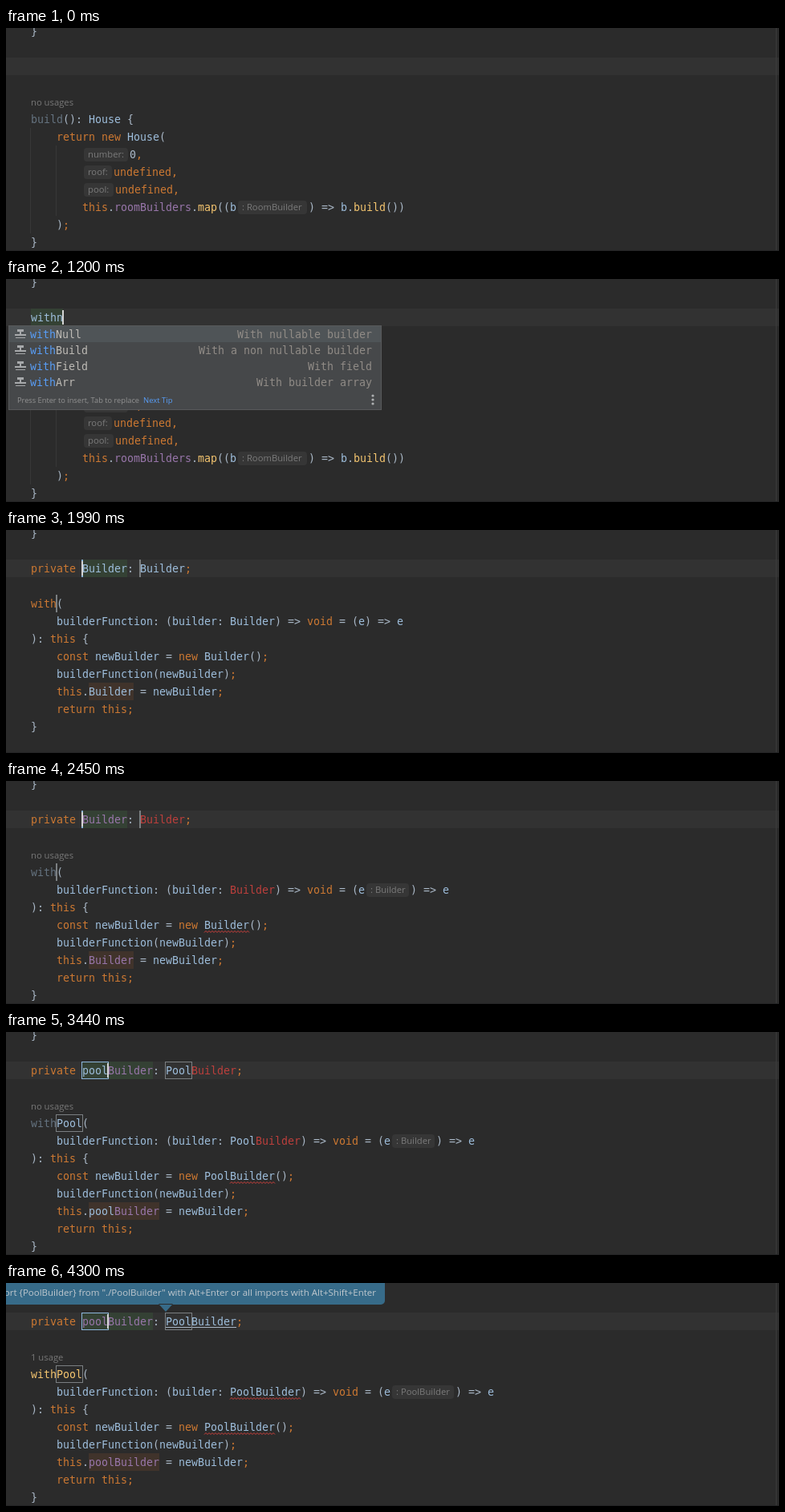
Recreate the animation shown at these times as an HTML page with a canvas. Size 963 by 279 pixels, loop 4.72 s.

```html
<!DOCTYPE html>
<html lang="en">
<head>
<meta charset="utf-8">
<title>Live template in a code editor</title>
<style>
html, body { margin: 0; width: 100%; height: 100%; overflow: hidden; background: #2b2b2b; }
canvas { display: block; }
</style>
</head>
<body>
<canvas id="stage" width="963" height="279"></canvas>
<script>
const ctx = document.getElementById('stage').getContext('2d');
const LOOP = 4720, CHAR = 8, LINE = 22, LEFT = 31, CARET_ROW = 48;
const MONO = '13.29px "DejaVu Sans Mono", monospace';
const ui = size => `${size}px "Open Sans", sans-serif`;

// Run styles: keyword, identifier, text, function, field, unused, error
const COLORS = {
  k: '#cc7832', i: '#9dbddb', t: '#a9b7c6', f: '#f3c46f',
  p: '#9876aa', u: '#64727f', r: '#bc3f3c'
};
const HINT_WIDTHS = {
  'number:': 59, 'roof:': 39, 'pool:': 41,
  ': RoomBuilder': 90, ': Builder': 57, ': PoolBuilder': 81
};
const TEMPLATES = [
  ['withNull', 'With nullable builder'],
  ['withBuild', 'With a non nullable builder'],
  ['withField', 'With field'],
  ['withArr', 'With builder array']
];

function rect(x, y, w, h, color) {
  ctx.fillStyle = color;
  ctx.fillRect(x, y, w, h);
}

function text(value, x, y, color, font = MONO, align = 'left') {
  ctx.font = font;
  ctx.fillStyle = color;
  ctx.textAlign = align;
  ctx.fillText(value, x, y);
}

function dot(x, y, r, color) {
  ctx.fillStyle = color;
  ctx.beginPath();
  ctx.arc(x, y, r, 0, Math.PI * 2);
  ctx.fill();
}

function hint(label, x, y) {
  const width = HINT_WIDTHS[label];
  ctx.fillStyle = '#363636';
  ctx.beginPath();
  ctx.roundRect(x + 2, y - 8, width - 4, 17, 4);
  ctx.fill();
  text(label, x + 7, y + 4, '#7b7b7b', ui(11.25));
  return width;
}

// Draws runs split by "|"; the first letter of a run is its style, "h" is an inlay hint.
function code(indent, y, line) {
  let x = LEFT + indent * CHAR;
  for (const run of line.split('|')) {
    const style = run[0], value = run.slice(1);
    if (style === 'h') {
      x += hint(value, x, y);
    } else {
      text(value, x, y + 5, COLORS[style]);
      x += value.length * CHAR;
    }
  }
}

function usages(label) {
  text(label, LEFT, 97, '#787878', ui(11.25));
}

function caret(column) {
  rect(LEFT + column * CHAR - 1, CARET_ROW - 9, 2, 18, '#d4d4d4');
}

function highlight(column, length, y, color) {
  rect(LEFT + column * CHAR, y - 11, length * CHAR, LINE, color);
}

function slot(column, length, y, color) {
  ctx.strokeStyle = color;
  ctx.lineWidth = 1;
  ctx.strokeRect(LEFT + column * CHAR - 0.5, y - 10.5, length * CHAR + 1, 21);
}

function wave(column, length, y) {
  const start = LEFT + column * CHAR;
  ctx.strokeStyle = '#d0413d';
  ctx.lineWidth = 1;
  ctx.beginPath();
  for (let x = 0; x <= length * CHAR; x += 2) ctx.lineTo(start + x, y + (x % 4 ? 7.5 : 9.5));
  ctx.stroke();
}

function drawEditor() {
  rect(0, 0, 963, 279, '#2b2b2b');
  rect(0, CARET_ROW - 11, 963, LINE, '#323232');
  rect(959, 0, 1, 279, '#3b3b3b');
  rect(0, 278, 963, 1, '#232425');
  code(0, 4, 't}');
}

function drawBuildMethod() {
  rect(30, 125, 1, 132, '#373737');
  rect(62, 147, 1, 88, '#373737');
  usages('no usages');
  code(0, 114, 'ubuild|t(): |iHouse |t{');
  code(4, 136, 'kreturn new |iHouse|t(');
  code(8, 158, 'hnumber:|t0|k,');
  code(8, 180, 'hroof:|kundefined,');
  code(8, 202, 'hpool:|kundefined,');
  code(8, 224, 'kthis|t.|proomBuilders|t.|fmap|t((|ib|h: RoomBuilder|t) => |ib|t.|fbuild|t())');
  code(4, 246, 't)|k;');
  code(0, 268, 't}');
}

function drawStamp(y) {
  const color = '#a7a9ab';
  rect(14, y - 6, 8, 3, color);
  rect(17, y - 3, 2, 4, color);
  rect(11, y, 14, 2, color);
  rect(12, y + 4, 12, 1, color);
}

function drawBulb(x, y) {
  dot(x, y - 2, 5, '#f0a732');
  rect(x - 2.5, y + 2, 5, 2, '#f0a732');
  rect(x - 2, y + 5, 4, 2, '#a7a9ab');
}

function drawPopup(items, matched, bulb) {
  const height = items.length * 20 + 26, footer = 72 + items.length * 20;
  rect(3, 58, 465, height, '#58595a');
  rect(4, 59, 463, height - 2, '#46484a');
  rect(4, 59, 463, 20, '#4f5457');
  items.forEach(([name, description], i) => {
    const y = 69 + i * 20;
    drawStamp(y);
    text(name.slice(0, matched), 30, y + 5, '#589df6');
    text(name.slice(matched), 30 + matched * CHAR, y + 5, '#bdbab5');
    text(description, 456, y + 5, '#908b86', MONO, 'right');
  });
  text('Press Enter to insert, Tab to replace', 14, footer + 3, '#929292', ui(9.25));
  text('Next Tip', 171, footer + 3, '#589df6', ui(9.5));
  for (const dy of [-6, -1, 4]) dot(457, footer + dy, 1.6, '#afb1b3');
  if (bulb) drawBulb(437, footer - 1);
}

function drawTyping(t) {
  const typed = 'withn'.slice(0, [550, 670, 770, 870, 1200].filter(at => t >= at).length);
  highlight(0, typed.length, CARET_ROW, '#344134');
  code(0, CARET_ROW, 'i' + typed);
  if (t >= 280) caret(typed.length);
  drawBuildMethod();
  if (t >= 1330) drawPopup(TEMPLATES.slice(0, 1), 5, true);
  else if (t >= 610) drawPopup(TEMPLATES, Math.min(typed.length, 4), false);
}

function drawTemplate(t) {
  const count = [2910, 3100, 3240, 3440].filter(at => t >= at).length;
  const name = 'pool'.slice(0, count), type = 'Pool'.slice(0, count);
  const analyzed = t >= 2320, inlays = t >= 2450;
  const resolved = t >= 3770, resolvedInlays = t >= 3900;
  const top = inlays ? 114 : 92;
  const row = n => top + n * LINE;

  const field = `${resolved ? 'p' : 'i'}${name}|${analyzed ? 'p' : 'i'}Builder`;
  const typeRef = `i${type}|${analyzed && !resolved ? 'r' : 'i'}Builder`;
  const method = resolved ? 'f' : analyzed ? 'u' : 'k';
  const param = resolvedInlays ? '|h: PoolBuilder' : inlays ? '|h: Builder' : '';
  const typeColumn = 17 + count;

  highlight(8, count + 7, CARET_ROW, '#344134');
  highlight(9, count + 7, row(5), '#40332b');
  code(0, CARET_ROW, `kprivate |${field}|t: |${typeRef}|k;`);
  if (inlays) usages(resolvedInlays ? '1 usage' : 'no usages');
  code(0, row(0), `${method}with|${resolved ? 'f' : 'i'}${type}|t(`);
  code(4, row(1), `ibuilderFunction|t: (|ibuilder|t: |${typeRef}|t) => |kvoid |t= (|ie${param}|t) => |ie`);
  code(0, row(2), 't): |kthis |t{');
  code(4, row(3), `kconst |inewBuilder |t= |knew |i${type}Builder|t()|k;`);
  code(4, row(4), 'ibuilderFunction|t(|inewBuilder|t)|k;');
  code(4, row(5), `kthis|t.|${field}|t = |inewBuilder|k;`);
  code(4, row(6), 'kreturn this;');
  code(0, row(7), 't}');

  if (resolved) {
    rect(LEFT + typeColumn * CHAR, CARET_ROW + 7, 88, 1, COLORS.t);
    wave(31, 11, row(1));
    wave(27, 11, row(3));
  } else if (analyzed) {
    wave(27 + count, 7, row(3));
  }
  slot(typeColumn, count, CARET_ROW, '#7b7f82');
  slot(4, count, row(0), '#7b7f82');
  slot(8, count, CARET_ROW, '#8db6dc');
  caret(8 + count);
}

function drawImportTip() {
  ctx.fillStyle = '#376b89';
  ctx.beginPath();
  ctx.roundRect(-20, -10, 492, 37, 5);
  ctx.moveTo(190, 26);
  ctx.lineTo(199, 36);
  ctx.lineTo(208, 26);
  ctx.fill();
  text('Import {PoolBuilder} from "./PoolBuilder" with Alt+Enter or all imports with Alt+Shift+Enter',
    461, 16, '#c0c8ce', ui(11.5), 'right');
}

function draw(t) {
  drawEditor();
  if (t < 1990) drawTyping(t);
  else drawTemplate(t);
  if (t >= 4300) drawImportTip();
}

const start = performance.now();
function tick() {
  draw((performance.now() - start) % LOOP);
  requestAnimationFrame(tick);
}
tick();
</script>
</body>
</html>
```
